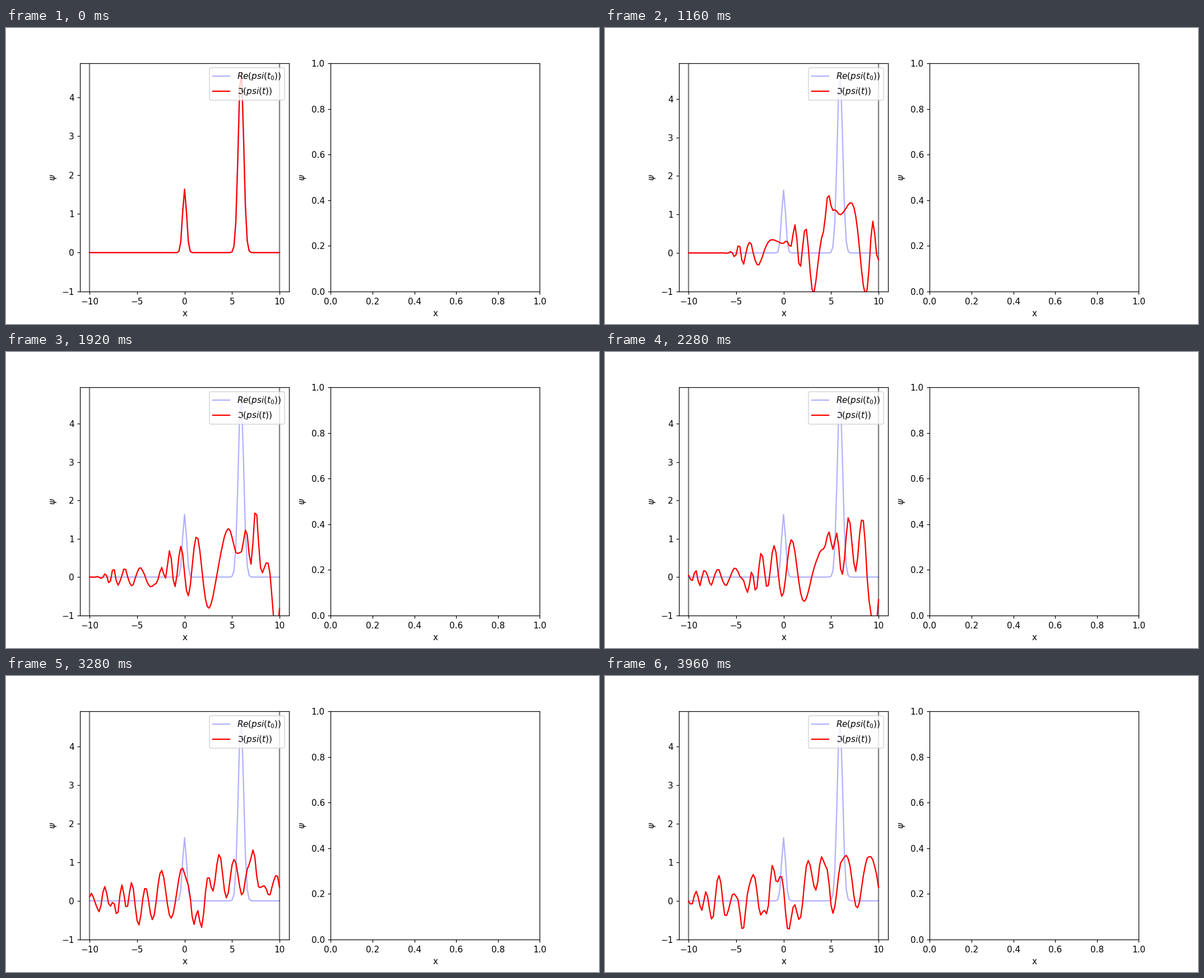
Write a matplotlib script that moves like this. It is 1058 by 529 pixels and loops after 4 s.

```python
import numpy as np
import matplotlib.pyplot as plt
from matplotlib.animation import FuncAnimation

FRAMES, INTERVAL = 100, 40
N, DX, DT = 101, 0.2, 1 / 30

x = np.linspace(-10, 10, N)


def bump(amp, center, sigma):
    return amp * np.exp(-(x - center) ** 2 / (4 * sigma ** 2))


psi0 = bump(1.631, 0, 0.15) + bump(4.76, 5.935, 0.2)

# Eigenmodes of the free particle on a grid with hard walls
k = np.arange(1, N + 1)
theta = k * np.pi / (N + 1)
modes = np.sqrt(2 / (N + 1)) * np.sin(np.outer(k, theta))
energy = (1 - np.cos(theta)) / DX ** 2
coeffs = modes.T @ psi0


def psi(t):
    return modes @ (coeffs * np.exp(-1j * energy * t))


fig, (ax, empty) = plt.subplots(1, 2, figsize=(9.6182, 4.8091), dpi=110)
for a in (ax, empty):
    a.set_xlabel("x")
    a.set_ylabel(r"$\psi$")

for wall in (-10, 10):
    ax.axvline(wall, color="gray")
ax.plot(x, psi0, color="blue", alpha=0.3, label="$Re(psi(t_0))$")
wave, = ax.plot(x, psi0, color="red", label=r"$\Im(psi(t))$")
ax.set_xlim(-11, 11)
ax.legend(loc="upper right")


def update(i):
    y = psi(i * DT).real
    wave.set_ydata(y)
    high = max(y.max(), psi0.max())
    low = min(y.min(), psi0.min())
    ax.set_ylim(-1, high + 0.05 * (high - low))
    return wave,


anim = FuncAnimation(fig, update, frames=FRAMES, interval=INTERVAL,
                     repeat=True, repeat_delay=0, blit=False)
plt.show()
```
